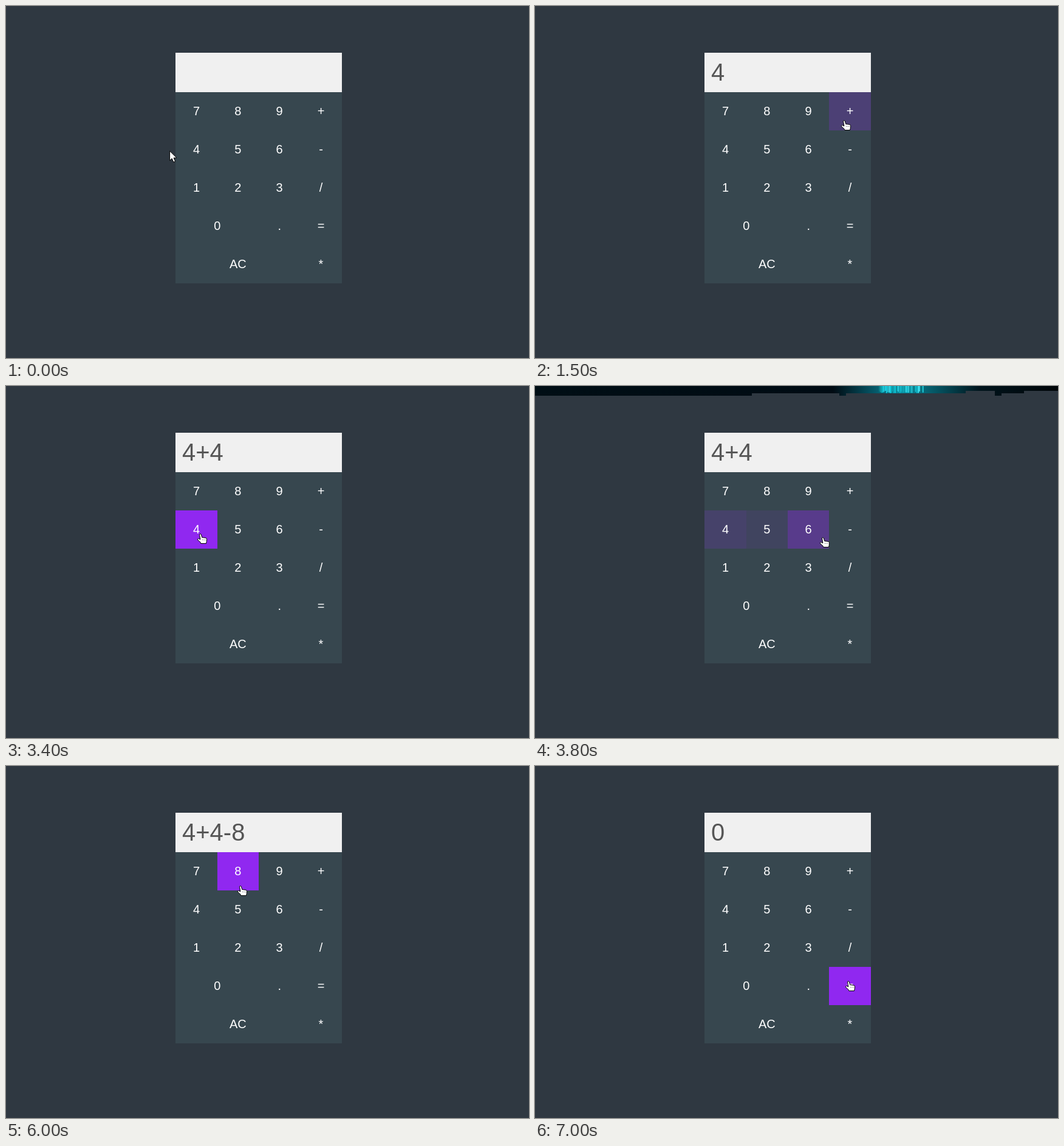
Recreate the animation shown at these times as an HTML page with a canvas. Size 861 px wide and 580 px high, loop 8000 ms.

```html
<!DOCTYPE html>
<html lang="en">
<head>
<meta charset="utf-8">
<title>Calculator</title>
<style>
html, body { margin: 0; width: 100%; height: 100%; overflow: hidden; background: #2f3841; }
body { position: relative; font: 20px "Liberation Sans", Arial, sans-serif; }
#strip, #display, #keys, svg { position: absolute; }
#strip { left: 0; top: 0; }
#display {
  left: 279px; top: 77px; width: 263px; height: 65px; padding-left: 11px;
  background: #f0f0f0; color: #555; font-size: 40px; line-height: 65px;
}
#keys {
  left: 279.45px; top: 142px; display: grid;
  grid-template: repeat(5, 63px) / repeat(4, 68.3px);
  background: #37474f; color: #fff; text-align: center; line-height: 63px;
}
svg { left: 0; top: 0; overflow: visible; fill: #fff; stroke: #000; stroke-linejoin: round; }
</style>
</head>
<body>
<canvas id="strip" width="861" height="16"></canvas>
<div id="display"></div>
<div id="keys"></div>
<svg id="arrow" width="14" height="22">
  <path d="M.6 1V16.6L4.2 13.3L6.7 19.2L9.6 18L7.1 12.2H11.9Z"/>
</svg>
<svg id="hand" width="18" height="20">
  <path d="M3.5 2C3.5 .2 6 .2 6.4 2L7.7 6.5L13.8 7.3Q15.6 7.7 15.5 9.6L15.2 13.4L14.5 16.5H5.8L5 14.4L1 11C-.3 9.5 1 7.8 2.5 8.8L4.9 9.9Z"/>
  <path d="M8 10.5h1M10.3 10.5h1M12.6 10.5h1" stroke="#555"/>
</svg>
<script>
const LOOP = 8000, TICK = 100, FADE = 300;
const $ = id => document.getElementById(id);
const clamp = u => Math.min(1, Math.max(0, u));

const rows = ["7 8 9 +", "4 5 6 -", "1 2 3 /", "0 0 . =", "AC AC AC *"].map(r => r.split(" "));
const presses = [[1000, "4"], [2000, "+"], [3400, "4"], [4600, "-"], [5600, "8"], [6900, "="]];

// Pointer moves: start, end, then the place it reaches
const home = [269, 238];
const moves = [
  [100, 600, 320, 243],
  [1050, 1200, 370, 120], [1200, 1420, 495, 125], [1420, 1500, 509, 188],
  [2310, 2400, 341, 222], [2400, 2700, 320, 243],
  [3560, 3900, 515, 251],
  [4680, 4855, 386, 197],
  [6000, 6650, 516, 354]
];

function pointAt(t) {
  let [x, y] = home;
  for (const [start, end, tx, ty] of moves) {
    const u = clamp((t - start) / (end - start)), s = u * u * (3 - 2 * u);
    x += (tx - x) * s;
    y += (ty - y) * s;
  }
  return [x, y];
}

function keyAt([x, y]) {
  const row = rows[Math.floor((y - 142) / 63)];
  return row && row[Math.floor((x - 279) / 68.4)];
}

// The CSS "ease" curve
function ease(u) {
  let lo = 0, hi = 1;
  for (let i = 0; i < 20; i++) {
    const s = (lo + hi) / 2;
    if (0.75 * s - 0.75 * s * s + s ** 3 < clamp(u)) lo = s; else hi = s;
  }
  return 0.3 * lo + 2.4 * lo * lo - 1.7 * lo ** 3;
}

// One element per key, with the spans of time the pointer is over it
const keys = {};
for (const row of rows)
  for (const label of new Set(row)) {
    const el = document.createElement("div");
    el.textContent = label;
    el.style.gridColumn = "span " + row.filter(l => l === label).length;
    $("keys").append(el);
    keys[label] = { el, spans: [] };
  }

for (let t = 0, last; t <= LOOP; t += 2) {
  const label = keyAt(pointAt(t)), spans = label && keys[label].spans;
  if (spans && label !== last) spans.push([t, t]);
  if (spans) spans[spans.length - 1][1] = t;
  last = label;
}

function glow(spans, t) {
  return Math.max(0, ...spans.map(([enter, leave]) => {
    const peak = ease((Math.min(t, leave) - enter) / FADE);
    return t <= leave ? peak : peak * (1 - ease((t - leave) / (FADE * peak + 1)));
  }));
}

function readout(t) {
  const text = presses.filter(p => p[0] <= t).map(p => p[1]).join("");
  return text.endsWith("=") ? text.match(/[+-]?\d+/g).reduce((sum, n) => sum + +n, 0) : text;
}

// Dark wallpaper sliver with a cyan glow and a ragged lower edge
function drawStrip() {
  const c = $("strip").getContext("2d");
  const g = c.createLinearGradient(0, 0, 861, 0);
  [[0, "#000e15"], [0.57, "#000b13"], [0.65, "#055868"], [0.7, "#0a90a3"],
   [0.75, "#066271"], [0.85, "#00141c"], [1, "#000508"]].forEach(stop => g.addColorStop(...stop));
  c.fillStyle = g;
  c.fillRect(0, 0, 861, 16);
  let seed = 7;
  const rnd = () => (seed = seed * 16807 % 2147483647) / 2147483647;
  for (let x = 566; x < 640; x += 2) {
    c.fillStyle = `hsl(185 85% ${28 + rnd() * 35}%)`;
    c.fillRect(x, 0, 1 + rnd(), 8 + rnd() * 4);
  }
  for (const [x, end, y] of [[357, 501, 12], [512, 709, 12], [709, 757, 8], [768, 805, 12], [805, 861, 8]])
    c.clearRect(x, y, end - x, 16);
}

function render(now) {
  const t = Math.floor(now % LOOP / TICK) * TICK;
  $("display").textContent = readout(t);
  for (const { el, spans } of Object.values(keys)) {
    const k = glow(spans, t);
    const mix = (a, b) => Math.round(a + (b - a) * k);
    el.style.background = k > 0.01 ? `rgb(${mix(55, 144)},${mix(71, 40)},${mix(79, 240)})` : "";
  }
  const [x, y] = pointAt(t).map(Math.round), overKey = keyAt([x, y]);
  $("arrow").style.display = overKey ? "none" : "";
  $("hand").style.display = overKey ? "" : "none";
  $("arrow").style.transform = `translate(${x}px,${y}px)`;
  $("hand").style.transform = `translate(${x - 5}px,${y}px)`;
  $("strip").style.display = t >= 3700 && t < 4600 ? "" : "none";
  $("strip").style.clipPath = t >= 4200 ? "inset(0 0 0 245px)" : "none";
}

function frame() {
  render(performance.now());
  requestAnimationFrame(frame);
}

drawStrip();
frame();
</script>
</body>
</html>
```
